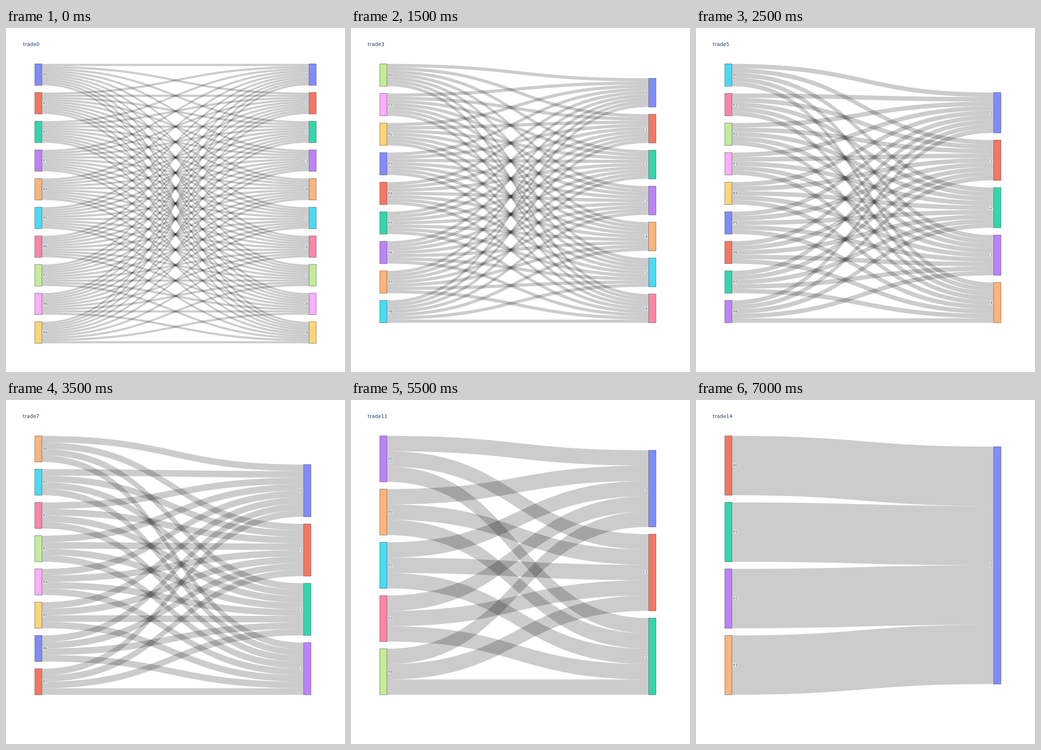
A matplotlib script that plays this animation: 742 by 755 pixels, repeating every 7.5 s.

```python
import matplotlib.pyplot as plt
from matplotlib.animation import FuncAnimation
from matplotlib.collections import PathCollection
from matplotlib.patches import Rectangle
from matplotlib.path import Path
from matplotlib.patheffects import Normal, withStroke

W, H, DPI = 742, 755, 64
PT = 72 / DPI  # points per pixel
SCALE = 0.7875
LEFT, TOP = 80 * SCALE, 100 * SCALE
THICK = GAP = 20 * SCALE
INK, EDGE = "#2a3f5f", "#444444"
COLORS = ["#636efa", "#ef553b", "#00cc96", "#ab63fa", "#ffa15a",
          "#19d3f3", "#ff6692", "#b6e880", "#ff97ff", "#fecb52"]

# (producers, consumers) left in each round
ROUNDS = [(10, 10), (10, 9), (9, 8), (9, 7), (9, 6), (9, 5), (8, 5), (8, 4),
          (7, 4), (7, 3), (6, 3), (5, 3), (5, 2), (4, 2), (4, 1)]

plt.rcParams["font.family"] = "DejaVu Sans"
fig = plt.figure(figsize=(W / DPI, H / DPI), dpi=DPI, facecolor="white")
ax = fig.add_axes([0, 0, 1, 1])


def ribbon(x0, y0, x1, y1, width):
    """Link of constant height between two nodes."""
    xm = (x0 + x1) / 2
    verts = [(x0, y0), (xm, y0), (xm, y1), (x1, y1),
             (x1, y1 + width), (xm, y1 + width), (xm, y0 + width),
             (x0, y0 + width), (x0, y0)]
    codes = [Path.MOVETO] + [Path.CURVE4] * 3 + [Path.LINETO]
    codes += [Path.CURVE4] * 3 + [Path.CLOSEPOLY]
    return Path(verts, codes)


def write(x, y, text, size, effect, ha="left"):
    ax.text(x, y, text, fontsize=size * PT, color=INK, ha=ha,
            va="baseline", path_effects=[effect])


def draw_node(x, y, height, color):
    ax.add_patch(Rectangle((x, y), THICK, height, fc=(color, 0.8), ec="none",
                           lw=0, snap=False, zorder=2))
    ax.add_patch(Rectangle((x, y), THICK, height, fc="none", ec=EDGE,
                           lw=0.65 * PT, snap=False, zorder=2))


def draw_label(x, y, text, ha):
    size = 10 * SCALE
    halo = withStroke(linewidth=2.2 * PT, foreground="white")
    write(x, y + 0.35 * size, text, size, halo, ha)


def update(i):
    ax.clear()
    ax.set(xlim=(0, W), ylim=(H, 0))
    ax.axis("off")

    right, bottom = (679, 692) if i == 0 else (667.35, 647)
    n_prod, n_cons = ROUNDS[i]
    span = bottom - TOP
    unit = (span - (n_prod - 1) * GAP) / (n_prod * n_cons)
    h_prod, h_cons = unit * n_cons, unit * n_prod

    # consumers rest on the bottom edge; a single one is centred
    slack = (n_prod - n_cons) * GAP
    top_cons = TOP + (slack / 2 if n_cons == 1 else slack)
    prods = [TOP + p * (h_prod + GAP) for p in range(n_prod)]
    cons = [top_cons + c * (h_cons + GAP) for c in range(n_cons)]

    x0, x1 = LEFT + THICK, right - THICK
    links = [ribbon(x0, yp + c * unit, x1, yc + p * unit, unit)
             for p, yp in enumerate(prods) for c, yc in enumerate(cons)]
    ax.add_collection(PathCollection(links, facecolors=[(0, 0, 0, 0.2)],
                                     edgecolors="none", linewidths=0,
                                     zorder=1), autolim=False)

    pad = 3 * SCALE
    for p, y in enumerate(prods):
        draw_node(LEFT, y, h_prod, COLORS[(n_cons + p) % len(COLORS)])
        draw_label(x0 + pad, y + h_prod / 2, f"P{p}", "left")
    for c, y in enumerate(cons):
        draw_node(x1, y, h_cons, COLORS[c])
        draw_label(x1 - pad, y + h_cons / 2, f"C{c}", "right")

    title_x = 0.05 * (right + LEFT)
    write(title_x, TOP / 2, f"trade{i}", 14 * SCALE, Normal())
    return []


anim = FuncAnimation(fig, update, frames=len(ROUNDS), interval=500,
                     init_func=lambda: [], repeat=True, repeat_delay=0)
plt.show()
```
